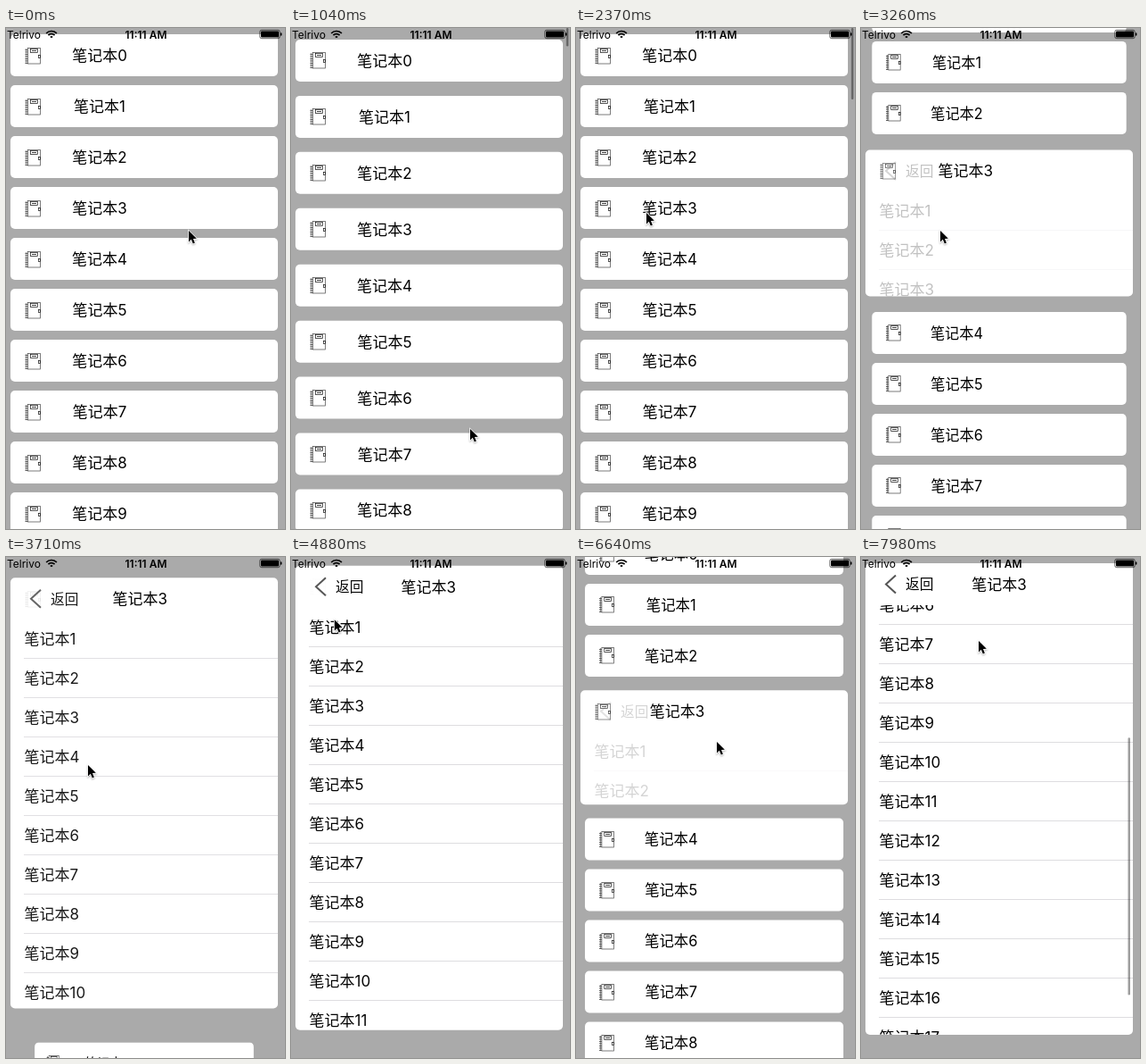
These frames come from a looping animation (313x561 px, 8 s). An HTML page with a canvas:

```html
<!DOCTYPE html>
<html lang="zh-CN">
<head>
<meta charset="utf-8">
<title>笔记本</title>
<style>
  html, body { margin: 0; width: 100%; height: 100%; overflow: hidden; background: #aaa; }
  canvas { display: block; width: 313px; height: 561px; }
</style>
</head>
<body>
<canvas id="stage"></canvas>
<script>
const W = 313, H = 561, LOOP = 8000, STEP = LOOP / 54.13;
const FONT = 'Inter, "Noto Sans CJK SC", "Noto Sans CJK", sans-serif';
const CARD = { x: 5, w: 300, h: 47, top: 7, pitch: 57 };
const CENTER = CARD.x + CARD.w / 2;
const CHOSEN = 3, OPEN_HEIGHT = 528, ROW = 44, ROWS = 18;
const FLICK_START = 7537;

const canvas = document.getElementById('stage');
const ctx = canvas.getContext('2d');
const ratio = window.devicePixelRatio || 1;
canvas.width = W * ratio;
canvas.height = H * ratio;

const progress = (t, from, to) => Math.min(1, Math.max(0, (t - from) / (to - from)));

// Ease-in-out, cubic-bezier(.42, 0, .58, 1), solved by bisection
function ramp(t, from, to) {
  const x = progress(t, from, to);
  let lo = 0, hi = 1;
  for (let i = 0; i < 20; i++) {
    const s = (lo + hi) / 2, r = 1 - s;
    if (1.26 * r * r * s + 1.74 * r * s * s + s ** 3 < x) lo = s; else hi = s;
  }
  return lo < 1e-5 ? 0 : lo * lo * (3 - 2 * lo);
}

const openness = t => ramp(t, 2910, 3910) - ramp(t, 4785, 5785) + ramp(t, 6366, 7366);
const pullGap = t => 6 * (ramp(t, 150, 1100) - ramp(t, 1400, 2000));
const listBarAlpha = t => progress(t, 150, 300) - progress(t, 2364, 2660);
const tableScroll = t => 242 * progress(t, FLICK_START, 7980) ** 2;

// Places where the hand pauses; it glides between them and drags the table at the end.
const stops = [
  { t: 150, x: 204, y: 226 }, { t: 1034, x: 200, y: 448 },
  { t: 2364, x: 78, y: 206 }, { t: 3694, x: 91, y: 232 },
  { t: 4580, x: 31, y: 39 }, { t: 5468, x: 103, y: 168 },
  { t: 6200, x: 157, y: 206 }, { t: FLICK_START, x: 131, y: 335 }
];

function cursorAt(t) {
  let { x, y } = stops[0];
  for (let i = 1; i < stops.length; i++) {
    const from = stops[i - 1], to = stops[i];
    // The hand rests on the expanding card before the last glide.
    const leave = i === stops.length - 1 ? 6650 : from.t;
    const f = ramp(t, leave, to.t);
    x += (to.x - from.x) * f;
    y += (to.y - from.y) * f;
  }
  return [x, y - tableScroll(t)];
}

function text(str, x, centerY, { size = 17, align = 'left', weight = 400 } = {}) {
  ctx.font = `${weight} ${size}px ${FONT}`;
  ctx.textAlign = align;
  ctx.fillStyle = '#000';
  ctx.fillText(str, x, Math.round(centerY + size * 0.38));
}

function roundRect(x, y, w, h, r, color) {
  ctx.beginPath();
  ctx.roundRect(x, y, w, h, r);
  ctx.fillStyle = color;
  ctx.fill();
}

function withAlpha(alpha, draw) {
  ctx.save();
  ctx.globalAlpha = alpha;
  draw();
  ctx.restore();
}

function notebook(cy) {
  ctx.save();
  ctx.translate(21, Math.round(cy - 9));
  ctx.strokeStyle = '#444';
  ctx.lineWidth = 0.7;
  ctx.strokeRect(3.5, 0.5, 14, 17.5);
  ctx.fillStyle = '#444';
  for (let y = 2; y < 18; y += 2.5) ctx.fillRect(0.5, y, 3, 0.8);
  ctx.fillRect(1.5, 1, 0.6, 17);
  ctx.strokeStyle = '#111';
  ctx.strokeRect(6.5, 1.5, 8, 4);
  ctx.fillRect(8, 3, 5, 1);
  ctx.strokeRect(15.5, 8.5, 2, 3);
  ctx.restore();
}

function closedCard(i, y, scale) {
  const cy = y + CARD.h / 2;
  ctx.save();
  ctx.translate(CENTER, 0);
  ctx.scale(scale, 1);
  ctx.translate(-CENTER, 0);
  roundRect(CARD.x, y, CARD.w, CARD.h, 5, '#fff');
  notebook(cy);
  text('笔记本' + i, 105, cy, { align: 'center' });
  ctx.restore();
}

function table(top, height, scroll) {
  const head = top + CARD.h;
  ctx.beginPath();
  ctx.rect(CARD.x, head, CARD.w, height - CARD.h);
  ctx.clip();
  for (let i = 0; i < ROWS; i++) {
    const y = head - 0.5 + i * ROW - scroll;
    text('笔记本' + (i + 1), 20.5, y + ROW / 2);
    ctx.fillStyle = '#dedde0';
    ctx.fillRect(20, Math.floor(y + ROW), 285, 1);
  }
  if (scroll > 0) {
    const view = OPEN_HEIGHT - CARD.h, content = ROWS * ROW, groove = view - 6;
    const length = groove * view / content;
    const offset = scroll / (content - view) * (groove - length);
    roundRect(299.5, head + 3 + offset, 2.5, length, 1.25, 'rgba(0,0,0,.38)');
  }
}

function backArrow(cy) {
  ctx.beginPath();
  ctx.moveTo(39, cy - 10);
  ctx.lineTo(28, cy);
  ctx.lineTo(39, cy + 10);
  ctx.strokeStyle = '#555';
  ctx.lineWidth = 2;
  ctx.stroke();
}

function openCard(p, scroll) {
  const restTop = CARD.top + CHOSEN * CARD.pitch;
  const top = restTop + (CARD.top - restTop) * p;
  const height = CARD.h + (OPEN_HEIGHT - CARD.h) * p;
  const cy = top + CARD.h / 2;
  ctx.save();
  roundRect(CARD.x, top, CARD.w, height, 5, '#fff');
  ctx.clip();
  withAlpha(1 - p, () => notebook(cy));
  withAlpha(p, () => {
    backArrow(cy);
    text('返回', 50, cy, { size: 15.7 });
    table(top, height, scroll);
  });
  text('笔记本' + CHOSEN, 105 + 50 * p, cy, { align: 'center' });
  ctx.restore();
}

function statusBar() {
  text('Telrivo', 1, 7, { size: 12 });
  text('11:11 AM', 157, 7, { size: 12, align: 'center', weight: 600 });
  ctx.strokeStyle = '#000';
  ctx.lineWidth = 1.7;
  for (const r of [1.5, 4.9, 8]) {
    ctx.beginPath();
    ctx.arc(51, 11.5, r, -Math.PI * 0.76, -Math.PI * 0.24);
    ctx.stroke();
  }
  ctx.lineWidth = 0.6;
  ctx.beginPath();
  ctx.roundRect(284.8, 2.3, 22.4, 9.4, 2);
  ctx.stroke();
  roundRect(286, 3.5, 20, 7, 1, '#000');
  roundRect(308, 5.2, 1.4, 3.6, 0.7, '#000');
}

const arrow = new Path2D('M0 0V14.5L3.3 11.4L5.6 16.8L8 15.8L5.8 10.6L10.3 10.3Z');

function pointer(x, y) {
  ctx.save();
  ctx.translate(x + 1, y + 1);
  ctx.scale(0.86, 0.86);
  ctx.lineWidth = 1.8;
  ctx.strokeStyle = '#fff';
  ctx.shadowColor = 'rgba(0,0,0,.3)';
  ctx.shadowBlur = 2 * ratio;
  ctx.shadowOffsetY = ratio;
  ctx.stroke(arrow);
  ctx.shadowColor = 'transparent';
  ctx.fillStyle = '#000';
  ctx.fill(arrow);
  ctx.restore();
}

function render(t) {
  const p = openness(t), gap = pullGap(t);

  ctx.setTransform(ratio, 0, 0, ratio, 0, 0);
  ctx.fillStyle = '#aaa';
  ctx.fillRect(0, 0, W, H);

  for (let i = 0; i < 11; i++) {
    if (i === CHOSEN && p > 0) continue;
    const shift = i < CHOSEN ? -202 * p : 341 * p;
    closedCard(i, CARD.top + i * CARD.pitch + gap * (i + 1) + shift, 1 - 0.2 * p);
  }
  if (p > 0) openCard(p, tableScroll(t));
  withAlpha(listBarAlpha(t), () =>
    roundRect(308.8, 0, 2.5, 80 - 10 * gap, 1.25, 'rgba(0,0,0,.4)'));
  statusBar();
  pointer(...cursorAt(t));
}

// The picture advances in even steps rather than smoothly.
const start = performance.now();
function frame() {
  const t = (performance.now() - start) % LOOP;
  render(Math.floor((t + 20) / STEP) * STEP);
  requestAnimationFrame(frame);
}
frame();
</script>
</body>
</html>
```
